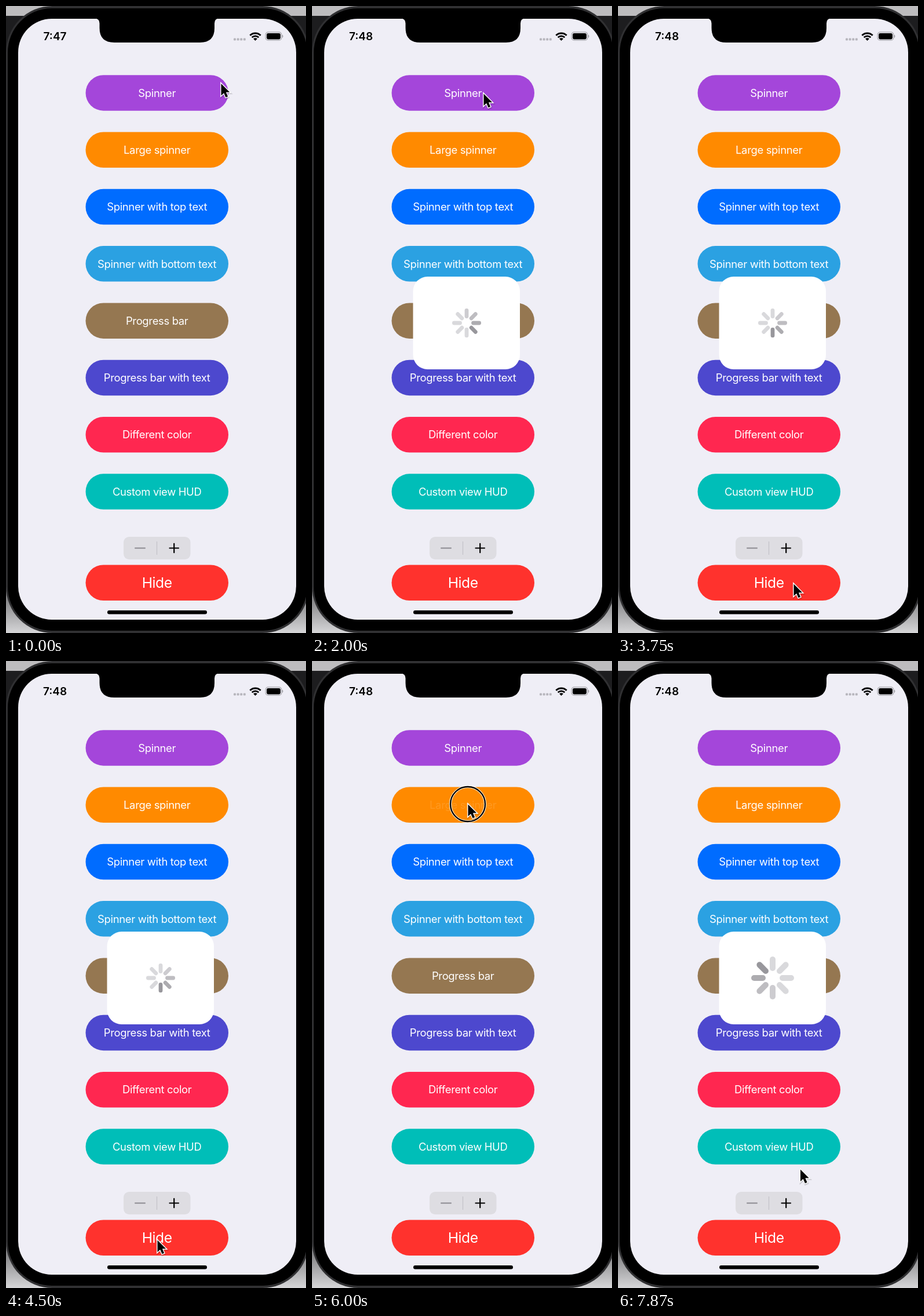
An HTML page that plays this animation: 518x1082 px, repeating every 8 s.

```html
<!DOCTYPE html>
<html lang="en">
<head>
<meta charset="utf-8">
<title>HUD demo</title>
<style>
  html, body { margin: 0; width: 100%; height: 100%; overflow: hidden; background: #1d1d1f; }
  svg { display: block; width: 100%; height: 100%; }
  text { font-family: Inter, "Open Sans", sans-serif; text-anchor: middle; letter-spacing: -.018em; }
  .label { font-size: 18.45px; fill: #fff; }
  .hide { font-size: 24.6px; }
  #clock { font-size: 19px; font-weight: 600; letter-spacing: 0; }
  #spinner line { stroke-width: 10; stroke-linecap: round; }
</style>
</head>
<body>
<svg viewBox="0 0 518 1082">
  <defs>
    <linearGradient id="floor" x2="0" y2="1">
      <stop offset="0" stop-color="#3a3a3c"/>
      <stop offset="1" stop-color="#d6d6d8"/>
    </linearGradient>
  </defs>

  <!-- desktop and phone body -->
  <rect width="518" height="17" fill="#bdbcbe"/>
  <rect y="970" width="518" height="112" fill="url(#floor)"/>
  <rect x="0" y="0" width="523" height="1082" rx="80" fill="#303032"/>
  <rect x="3" y="4" width="517" height="1074" rx="76"/>
  <rect x="21" y="22" width="480" height="1037" rx="58" fill="#efeef6"/>
  <path d="M154 21.5Q161.5 22 161.5 30V38Q161.5 63 187 63H335Q360 63 360 38V30Q360 22 367 21.5Z"/>

  <!-- status bar -->
  <text id="clock" x="84.5" y="59"></text>
  <g fill="#b7b6bd">
    <rect x="393" y="55.5" width="4" height="4" rx="1.2"/>
    <rect x="398.6" y="55.5" width="4" height="4" rx="1.2"/>
    <rect x="404.2" y="55.5" width="4" height="4" rx="1.2"/>
    <rect x="409.8" y="55.5" width="4" height="4" rx="1.2"/>
  </g>
  <g transform="translate(430.5 60)" fill="none" stroke="#000" stroke-width="2.8">
    <path d="M-9.2-9.2A13 13 0 0 1 9.2-9.2"/>
    <path d="M-5.8-5.8A8.2 8.2 0 0 1 5.8-5.8"/>
    <path d="M0 0L-3.4-3.4A4.8 4.8 0 0 1 3.4-3.4Z" fill="#000" stroke="none"/>
  </g>
  <rect x="448.2" y="45.2" width="27.6" height="14" rx="4.4" fill="none" stroke="#a3a2a8" stroke-width="1.2"/>
  <rect x="450" y="47" width="24" height="10.4" rx="2.8"/>
  <path d="M477.2 50Q479 52.2 477.2 54.4Z" fill="#a3a2a8" stroke="#a3a2a8"/>

  <g id="buttons"></g>

  <!-- stepper -->
  <rect x="203" y="916" width="115.5" height="39" rx="9.5" fill="#dedde2"/>
  <path d="M260.5 924V947" stroke="#c3c2c8" stroke-width="1.2"/>
  <path d="M223 935.5H240" stroke="#8b8a90" stroke-width="2" stroke-linecap="round"/>
  <path d="M282.5 935.5H298M290.2 927.8V943.2" stroke="#000" stroke-width="2.2" stroke-linecap="round"/>
  <rect x="175" y="1043" width="172" height="6.5" rx="3.2"/>

  <g id="hud">
    <rect x="174.5" y="467" width="184.5" height="160" rx="25" fill="#fff"/>
    <g id="spinner"></g>
  </g>

  <g id="ring" fill="none">
    <circle r="30" stroke="#fff" stroke-opacity=".85" stroke-width="4.4"/>
    <circle r="30" stroke="#000" stroke-width="2.3"/>
  </g>
  <g id="cursor">
    <path d="M0 0V20.5L4.7 16.2L8 23.7L11.6 22.2L8.4 14.8H14.7Z" transform="translate(.6 1.4)"
          fill="#000" fill-opacity=".2" stroke="#000" stroke-opacity=".14" stroke-width="4"/>
    <path d="M0 0V20.5L4.7 16.2L8 23.7L11.6 22.2L8.4 14.8H14.7Z"
          stroke="#fff" stroke-width="2.8" paint-order="stroke"/>
  </g>
</svg>
<script>
const LOOP = 8000, STEP = 125;
const $ = id => document.getElementById(id);

function add(parent, tag, attrs, content = '') {
  const el = document.createElementNS('http://www.w3.org/2000/svg', tag);
  for (const key in attrs) el.setAttribute(key, attrs[key]);
  el.textContent = content;
  return parent.appendChild(el);
}

function addButton(name, color, y, big) {
  add($('buttons'), 'rect', { x: 137.5, y, width: 246.5, height: 61.5, rx: 30.75, fill: color });
  return add($('buttons'), 'text', {
    class: big ? 'label hide' : 'label', x: 260.7, y: y + (big ? 39.7 : 37.4)
  }, name);
}

const labels = [
  ['Spinner', '#a446da'],
  ['Large spinner', '#ff8a00'],
  ['Spinner with top text', '#006cff'],
  ['Spinner with bottom text', '#2ba1e2'],
  ['Progress bar', '#957751'],
  ['Progress bar with text', '#4d48ce'],
  ['Different color', '#ff2750'],
  ['Custom view HUD', '#00beb8']
].map(([name, color], i) => addButton(name, color, 119.2 + 98.3 * i));
const hideLabel = addButton('Hide', '#ff322d', 964.5, true);

const spokes = Array.from({ length: 8 }, (_, i) =>
  add($('spinner'), 'line', { y1: -17, y2: -32, transform: `rotate(${i * 45})` }));
const spokeShades = ['#98979c', '#adacb0', '#bebdc1', '#cdccd0'];

// time, x, y of the pointer tip
const path = [
  [0, 371.5, 134], [620, 296.5, 151.5], [2250, 296.5, 151.5],
  [3375, 303.5, 997.5], [3875, 303.5, 997.5], [4375, 261.5, 999.5],
  [5125, 261.5, 999.5], [5875, 269.5, 247.5], [6250, 269.5, 247.5],
  [6875, 328.5, 638.5], [7500, 315, 877.5], [LOOP, 315, 877.5]
];
const presses = [
  { label: labels[0], down: 1000, up: 1250 },
  { label: hideLabel, down: 4625, up: 4875 },
  { label: labels[1], down: 5875, up: 6125 }
];

const clamp = v => Math.min(1, Math.max(0, v));
const ramp = (t, start, length) => clamp((t - start) / length);

function pointerAt(t) {
  const i = path.findIndex(p => p[0] > t);
  const [t0, x0, y0] = path[i - 1], [t1, x1, y1] = path[i];
  const u = (t - t0) / (t1 - t0), k = u * u * (3 - 2 * u);
  return [x0 + (x1 - x0) * k, y0 + (y1 - y0) * k];
}

function drawSpinner(t) {
  const large = t >= 6000;
  const head = Math.floor(t / 100 + (large ? .5 : 7.2));
  $('spinner').setAttribute('transform', `translate(267 547) scale(${large ? 1 : .676})`);
  spokes.forEach((spoke, i) => {
    const lag = (head - i + 8) % 8;
    spoke.setAttribute('stroke', spokeShades[lag] || '#d9d9dc');
  });
}

function render(t) {
  const [x, y] = pointerAt(t);
  $('cursor').setAttribute('transform', `translate(${x} ${y})`);
  $('ring').setAttribute('transform', `translate(${x - .5} ${y - .5})`);
  $('ring').style.display = presses.some(p => t >= p.down && t < p.up) ? '' : 'none';
  for (const { label, down, up } of presses)
    label.style.opacity = t < down ? 1 : .12 + .88 * ramp(t, up, 400);
  $('clock').textContent = t < 1000 ? '7:47' : '7:48';
  $('hud').style.opacity = ramp(t, 1250, 200) - ramp(t, 4875, 125) + ramp(t, 6125, 200);
  drawSpinner(t);
}

const start = performance.now();
function tick() {
  const t = (performance.now() - start) % LOOP;
  render(Math.floor((t + 5) / STEP) * STEP % LOOP);
  requestAnimationFrame(tick);
}
tick();
</script>
</body>
</html>
```
